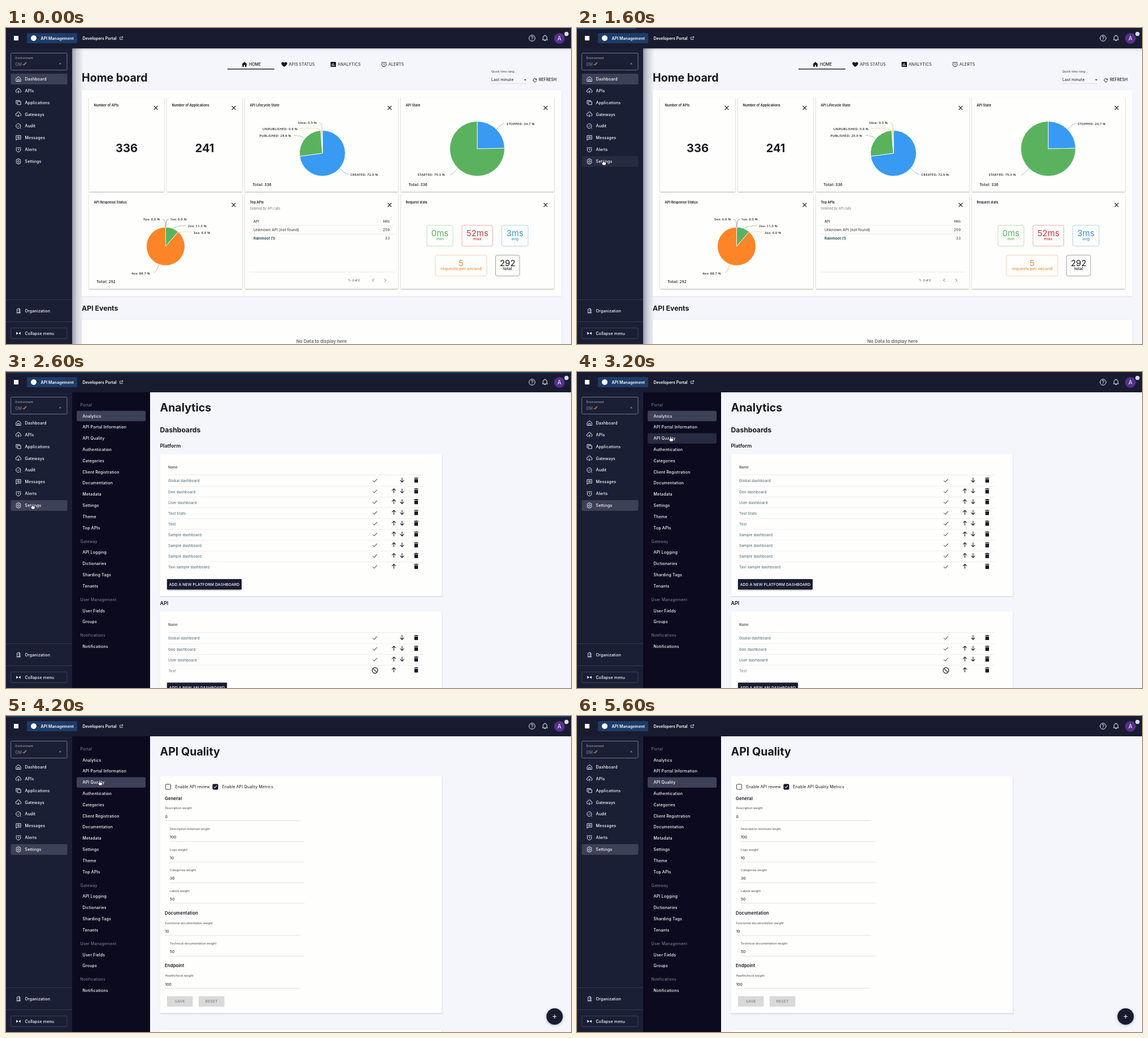
Recreate the animation shown at these times as an HTML page with a canvas. Size 1000 px wide and 560 px high, loop 6000 ms.

```html
<!DOCTYPE html>
<html lang="en">
<head>
<meta charset="utf-8">
<title>API console</title>
<style>
html, body { margin: 0; width: 100%; height: 100%; overflow: hidden; background: #f5f6fb; }
canvas { display: block; }
</style>
</head>
<body>
<canvas id="stage" width="1000" height="560"></canvas>
<script>
const c = document.getElementById('stage').getContext('2d');
const LOOP = 6000, STEP = 200;
const DARK = '#191c31', PAPER = '#fefefc', INK = '#18191f', LIT = '#3d4158', HOVER = '#272b41';
const BLUE = '#389af2', GREEN = '#5ab25f', ORANGE = '#fd8527', RED = '#cb3a3c', YELLOW = '#f3c55b';
const RULE = '#e3e4e6';

const ICON = {
  home: 'M3 10L12 3l9 7v11H3zM9 21v-8h6v8',
  upload: 'M7 18a5 5 0 0 1-1-10 6 6 0 0 1 12 1 4.5 4.5 0 0 1 0 9M12 22V12M8 16l4-4 4 4',
  squares: 'M8 8h13v12H8zM5 16H3V4h14v2',
  cloud: 'M7 18a5 5 0 0 1-1-10 6 6 0 0 1 12 1 4.5 4.5 0 0 1 0 9M12 12v9M8 17l4 4 4-4',
  audit: 'M18 18a9 9 0 1 0-3 2M17 17l5 5M8 11l3 3 5-5',
  message: 'M3 3h18v14H8l-5 4zM7 8h10M7 12h10',
  alarm: 'M12 4a8.5 8.5 0 1 0 .1 0M12 8v5l3 2M2 6l4-4M22 6l-4-4',
  gear: 'M9.5 2h5l1 3 3-1L21 8l-2 3v2l2 3-2.5 4-3-1-1 3h-5l-1-3-3 1L3 16l2-3v-2L3 8l2.5-4 3 1zM12 8.5a3.5 3.5 0 1 0 .1 0',
  door: 'M6 21V5l9-3v19zM15 5h4v16h-4M11 11v2M4 21h17',
  open: 'M10 5H4v15h15v-6M14 3h7v7M21 3l-10 10',
  help: 'M12 1.5a10.5 10.5 0 1 0 .1 0M8.5 9q0-3 3.5-3t3.5 3q0 2-2 3-1.5 1-1.5 3M12 17v1.5',
  bell: 'M3 18h18l-2-3V9q-1-6-7-6T5 9v6zM10 21h4M12 3V1',
  refresh: 'M20 8a9 9 0 1 0 1 6M21 3v6h-6',
  check: 'M3 12l6 6L21 5',
  up: 'M12 22V3M4 11l8-8 8 8',
  down: 'M12 2v19M4 13l8 8 8-8',
  block: 'M12 2a10 10 0 1 0 .1 0M5 5l14 14',
  cross: 'M4 4l16 16M20 4L4 20',
  left: 'M15 5l-7 7 7 7',
  right: 'M9 5l7 7-7 7',
  plus: 'M12 3v18M3 12h18',
  solidHome: 'M12 2L1 12h3v9h6v-7h4v7h6v-9h3z',
  heart: 'M12 22Q-2 12 1 6 6-1 12 6q6-7 11 0 3 6-11 16z',
  trash: 'M5 8h14v14H5zM4 3h5l1-1h4l1 1h5v3H4z',
  caret: 'M4 8h16l-8 9z',
  collapse: 'M2 5l9 7-9 7zM22 5l-9 7 9 7z',
  hand: 'M8 23L3 15q-2-3 0-4 2 0 4 3V3q0-2 2-2t2 2v6q10 0 10 4v5l-3 5z'
};
for (const k in ICON) ICON[k] = new Path2D(ICON[k]);

function text(s, x, y, size = 7, color = INK, weight = 500, gap = 0, align = 'left', font = 'Inter') {
  c.font = `${weight} ${size}px ${font}, sans-serif`;
  c.letterSpacing = gap + 'px';
  c.textAlign = align;
  c.fillStyle = color;
  c.fillText(s, x, y);
}
const title = (s, x, y, size = 19.6) => text(s, x, y, size, INK, 700);

function rect(x, y, w, h, color) {
  c.fillStyle = color;
  c.fillRect(x, y, w, h);
}
function box(x, y, w, h, r, fill, line) {
  c.beginPath();
  c.roundRect(x, y, w, h, r);
  if (fill) { c.fillStyle = fill; c.fill(); }
  if (line) { c.strokeStyle = line; c.lineWidth = 1; c.stroke(); }
}
function dot(x, y, r, color) {
  c.beginPath();
  c.arc(x, y, r, 0, 7);
  c.fillStyle = color;
  c.fill();
}
function card(x, y, w, h, blur = 2, alpha = .35) {
  c.save();
  c.shadowColor = `rgba(30,30,50,${alpha})`;
  c.shadowBlur = blur;
  c.shadowOffsetY = 1;
  rect(x, y, w, h, PAPER);
  c.restore();
}
// Fades from the point (x, y) over dx or dy pixels.
function shade(x, y, w, h, dx, dy, alpha) {
  const g = c.createLinearGradient(x, y, x + dx, y + dy);
  g.addColorStop(0, `rgba(25,28,55,${alpha})`);
  g.addColorStop(.4, `rgba(25,28,55,${alpha * .4})`);
  g.addColorStop(1, 'rgba(25,28,55,0)');
  rect(x, y, w, h, g);
}
// Icons are drawn on a 24-unit grid around their centre.
function icon(name, x, y, size, color, line = 2, fill) {
  c.save();
  c.translate(x - size / 2, y - size / 2);
  c.scale(size / 24, size / 24);
  if (fill) { c.fillStyle = fill; c.fill(ICON[name]); }
  if (line) { c.strokeStyle = color; c.lineWidth = line; c.stroke(ICON[name]); }
  c.restore();
}
const solid = (name, x, y, size, color) => icon(name, x, y, size, color, 0, color);

// Linear interpolation over [time, ...values] rows.
function at(keys, t) {
  const i = keys.findIndex(k => k[0] > t);
  if (i < 0) return keys[keys.length - 1].slice(1);
  if (!i) return keys[0].slice(1);
  const a = keys[i - 1], b = keys[i], p = (t - a[0]) / (b[0] - a[0]);
  return a.slice(1).map((v, j) => v + (b[j + 1] - v) * p);
}
const inside = (p, x, y, w, h) => p && p[0] > x && p[0] < x + w && p[1] > y && p[1] < y + h;

function header() {
  rect(0, 0, 1000, 36, DARK);
  rect(14, 14, 8, 8, '#fff');
  box(37, 9, 89, 18, 2, '#1d3c68');
  dot(49, 18, 5, '#fff');
  text('API Management', 61.5, 20.5, 7, '#fff', 600, .05);
  text('Developers Portal', 135.5, 20.5, 7, '#fff', 600);
  icon('open', 204, 18, 7, '#fff', 2.6);
  icon('help', 931, 18, 12, '#fff');
  icon('bell', 954, 18, 12, '#fff');
  dot(979.5, 18.5, 9.5, '#56308a');
  text('A', 979.5, 22, 10, '#fff', 400, 0, 'center');
  dot(992, 10.5, 3.7, '#dcdce8');
}

const MENU = [['Dashboard', 'home'], ['APIs', 'upload'], ['Applications', 'squares'], ['Gateways', 'cloud'],
  ['Audit', 'audit'], ['Messages', 'message'], ['Alerts', 'alarm'], ['Settings', 'gear']];

function sidebar(active, mouse) {
  rect(0, 36, 117, 524, '#1a1f36');
  box(8.5, 44.5, 99.5, 30, 2, null, '#6f7386');
  text('Environment', 16.5, 55, 5.2, '#b4b7c4', 400, .05);
  text('DM-', 16.5, 66.5, 7, '#858998', 400);
  c.lineWidth = 2;
  c.strokeStyle = '#a9713f';
  c.beginPath();
  c.moveTo(31, 66);
  c.lineTo(36, 61);
  c.stroke();
  solid('caret', 96, 63.5, 6, '#9a9dab');
  MENU.forEach(([name, ic], i) => {
    const y = 90.5 + 20.85 * i;
    if (i === active) box(8.5, y - 9.5, 100, 19, 2, LIT);
    else if (inside(mouse, 8, y - 9.5, 100, 19)) box(8.5, y - 9.5, 100, 19, 2, HOVER);
    icon(ic, 22, y, 11, '#fff', 1.9);
    text(name, 33.5, y + 2.5, 7, '#fff', 500, .2);
  });
  rect(0, 481, 117, 1, '#363a50');
  rect(0, 520, 117, 1, '#363a50');
  icon('door', 22, 501, 10, '#fff', 1.9);
  text('Organization', 33.5, 503.5, 7, '#fff', 500, .15);
  box(8.5, 531.5, 99.5, 19, 2, null, '#3d4157');
  solid('collapse', 22, 541, 9, '#fff');
  text('Collapse menu', 33.5, 543.5, 7, '#fff', 500, .15);
}

function pie(x, y, r, parts) {
  let a = -Math.PI / 2;
  for (const [share, color] of parts) {
    const b = a + share * Math.PI * 2;
    c.beginPath();
    c.moveTo(x, y);
    c.arc(x, y, r + .5, a, b);
    c.closePath();
    c.fillStyle = color;
    c.fill();
    c.strokeStyle = '#fff';
    c.lineWidth = .8;
    c.stroke();
    a = b;
  }
}
function lead(color, x1, y1, qx, qy, x2, y2) {
  c.beginPath();
  c.moveTo(x1, y1);
  c.quadraticCurveTo(qx, qy, x2, y2);
  c.strokeStyle = color;
  c.lineWidth = .6;
  c.stroke();
}
const label = (s, x, y, size = 5.8) => text(s, x, y, size, '#222', 600, .2, 'left', 'Open Sans');

function stat(x, y, w, color, value, unit) {
  c.globalAlpha = .4;
  box(x, y, w, 37, 3, null, color);
  c.globalAlpha = 1;
  text(value, x + w / 2, y + 19.7, 15, color, 400, 0, 'center');
  text(unit, x + w / 2, y + 26.5, 7.3, color, 500, .05, 'center');
}

function homePage() {
  rect(117, 36, 883, 524, '#f5f6fb');
  shade(117, 36, 20, 524, 20, 0, .42);
  shade(117, 36, 883, 4, 0, 4, .3);

  const grey = '#3d3f48';
  solid('solidHome', 422, 64.5, 11, INK);
  text('HOME', 430, 67, 7, INK, 500);
  rect(392, 72, 83, 1.4, INK);
  solid('heart', 492.5, 64.5, 11, INK);
  text('APIS STATUS', 500.5, 67, 7, grey, 500, .1);
  box(574.5, 60, 9.5, 9, 1, INK);
  [[577, 64], [579, 62], [581, 65]].forEach(([x, y]) => rect(x - .4, y, .9, 67.5 - y, '#fff'));
  text('ANALYTICS', 587, 67, 7, grey, 500, .1);
  icon('alarm', 669, 64.5, 11, INK);
  text('ALERTS', 677, 67, 7, grey, 500, .1);

  title('Home board', 134, 95);
  text('Quick time rang...', 859, 79, 5.4, '#555', 500);
  text('Last minute', 859, 94, 7, INK, 400, .1);
  rect(859, 98, 62, .7, '#d3d4d9');
  solid('caret', 919, 92, 6, '#333');
  icon('refresh', 936, 92.5, 8, INK, 2.8);
  text('REFRESH', 943, 94, 7, INK, 500);

  card(134, 110, 849, 365, 3, .08);
  const cards = [[147, 123, 133, 'Number of APIs'], [285, 123, 133, 'Number of Applications'],
    [423, 123, 271, 'API Lifecycle State'], [699, 123, 271, 'API State'],
    [147, 295, 271, 'API Response Status'], [423, 295, 271, 'Top APIs'], [699, 295, 271, 'Request stats']];
  for (const [x, y, w, name] of cards) {
    card(x, y, w, 167);
    text(name, x + 8.5, y + 16.3, 5.8, INK, 600);
    icon('cross', x + w - 15, y + 18.5, 10, INK, 2.8);
  }
  text('336', 213.5, 219.5, 20, INK, 700, 0, 'center');
  text('241', 351.5, 219.5, 20, INK, 700, 0, 'center');

  pie(560, 222, 40, [[.729, BLUE], [.259, GREEN], [.009, YELLOW], [.003, ORANGE]]);
  lead(BLUE, 590, 248, 597, 257, 606, 260);
  lead(GREEN, 510, 190.5, 521, 190, 529, 196);
  lead(YELLOW, 520, 178, 556, 176, 557.5, 182);
  lead(ORANGE, 554, 167, 560, 168, 559.5, 182);
  label('Slice: 0.3 %', 517, 169.5);
  label('UNPUBLISHED: 0.9 %', 454, 181);
  label('PUBLISHED: 25.9 %', 448.5, 192.5);
  label('CREATED: 72.9 %', 609.5, 262);
  label('Total: 336', 436.5, 279.5, 6.8);

  pie(834, 214, 48, [[.247, BLUE], [.753, GREEN]]);
  lead(BLUE, 868, 180, 875, 171, 882, 169);
  lead(GREEN, 800, 248, 793, 258, 786, 260);
  label('STOPPED: 24.7 %', 886, 171.5);
  label('STARTED: 75.3 %', 728.5, 262);
  label('Total: 336', 712.5, 279.5, 6.8);

  pie(282.5, 387, 33.5, [[.113, GREEN], [.887, ORANGE]]);
  lead('#8085e9', 277, 339, 282, 338, 282.3, 353);
  lead('#444', 288, 339, 283, 338, 282.7, 353);
  lead(GREEN, 318, 350.5, 301, 350, 294, 356);
  lead(YELLOW, 328, 362, 318, 359, 305, 363);
  lead(ORANGE, 270.5, 419, 267, 431, 262, 434);
  label('5xx: 0.0 %', 243, 341);
  label('1xx: 0.0 %', 290.5, 341);
  label('2xx: 11.3 %', 322, 353);
  label('3xx: 0.0 %', 332, 364.5);
  label('4xx: 88.7 %', 222, 436.5);
  label('Total: 292', 160.5, 451.5, 6.8);

  text('Ordered by API calls', 431.5, 322, 5.6, '#777', 400);
  text('API', 438, 345, 6, '#333', 500, .1);
  text('Hits', 679, 345, 6, '#333', 500, .1, 'right');
  text('Unknown API (not found)', 438, 360.3, 6.8, '#333', 400);
  text('259', 679, 360.3, 6.6, '#333', 400, 0, 'right');
  text('Rainmoot (1)', 438, 374.8, 6.4, '#173f49', 600);
  text('33', 679, 374.8, 6.6, '#333', 400, 0, 'right');
  [349.5, 364.5, 432].forEach(y => rect(431.5, y, 256, .7, RULE));
  text('1 - 2 of 2', 606, 448.7, 4.8, '#333', 500);
  icon('left', 650, 447, 9, '#333');
  icon('right', 671, 447, 9, '#333');

  stat(745, 349.5, 46, GREEN, '0ms', 'min');
  stat(807, 349.5, 54.5, RED, '52ms', 'max');
  stat(877.5, 349.5, 46.5, '#389ad6', '3ms', 'avg');
  stat(760, 402.5, 91, '#ec8f38', '5', 'requests per second');
  stat(866.5, 402.5, 42.5, INK, '292', 'total');

  title('API Events', 134, 501, 12.3);
  card(134, 517, 849, 60, 3, .12);
  text('No Data to display here', 558.5, 558, 8, '#666', 600, 0, 'center');
}

const SUBMENU = {
  'Portal': ['Analytics', 'API Portal Information', 'API Quality', 'Authentication', 'Categories',
    'Client Registration', 'Documentation', 'Metadata', 'Settings', 'Theme', 'Top APIs'],
  'Gateway': ['API Logging', 'Dictionaries', 'Sharding Tags', 'Tenants'],
  'User Management': ['User Fields', 'Groups'],
  'Notifications': ['Notifications']
};

function submenu(active, mouse) {
  rect(117, 36, 138, 524, '#0c0a1e');
  let y = 60.8;
  for (const group in SUBMENU) {
    text(group, 131.5, y, 7, '#85869a', 400, .2);
    for (const name of SUBMENU[group]) {
      y += 19.8;
      if (name === active) box(125, y - 11.8, 122, 18.5, 2, LIT);
      else if (inside(mouse, 125, y - 11.8, 122, 18.5)) box(125, y - 11.8, 122, 18.5, 2, HOVER);
      text(name, 135.5, y, 7, '#fff', 500, .2);
    }
    y += 24;
  }
}

function button(s, x, y, w, fill, color, shadow) {
  c.save();
  if (shadow) {
    c.shadowColor = 'rgba(0,0,0,.35)';
    c.shadowBlur = 3;
    c.shadowOffsetY = 1;
  }
  box(x, y, w, 18.5, 1, fill);
  c.restore();
  text(s, x + w / 2, y + 11.7, 6.8, color, 500, .1, 'center');
}

function table(y, h, names, add, w) {
  card(272.5, y, 499, h, 2, .18);
  text('Name', 287, y + 25, 5.8, '#555', 600, .1);
  rect(287, y + 36.5, 452, .7, RULE);
  names.forEach((name, i) => {
    const row = y + 47.5 + 19.1 * i, last = i === names.length - 1, off = last && name === 'Test';
    text(name, 287, row + 2.4, 6.5, off ? '#777' : '#3d6270', off ? 'italic 400' : 400, .1);
    icon(off ? 'block' : 'check', 653, row - .5, off ? 12 : 10, INK, 2.4);
    if (i) icon('up', 686.5, row - 1.5, 10, INK, 2.6);
    if (!last) icon('down', 701, row - 1.5, 10, INK, 2.6);
    solid('trash', 726, row - 1.5, 11, INK);
    if (!last) rect(287, row + 9.2, 452, .6, RULE);
  });
  button(add, 285, y + 49.5 + 19.1 * names.length, w, DARK, '#fff', true);
}

function analyticsPage() {
  title('Analytics', 272.5, 70);
  title('Dashboards', 272.5, 106.5, 12.2);
  text('Platform', 272.5, 134, 9, INK, 600);
  table(145.5, 251.5, ['Global dashboard', 'Geo dashboard', 'User dashboard', 'Test Stats', 'Test',
    'Sample dashboard', 'Sample dashboard', 'Sample dashboard', 'Tavi sample dashboard'],
    'ADD A NEW PLATFORM DASHBOARD', 132);
  text('API', 272.5, 413, 9, INK, 600);
  table(424.5, 160, ['Global dashboard', 'Geo dashboard', 'User dashboard', 'Test'],
    'ADD A NEW API DASHBOARD', 106);
}

const FIELDS = [['Description weight', 0, 0, 178], ['Description minimum length', 100, 1, 214.6],
  ['Logo weight', 10, 1, 251.2], ['Categories weight', 30, 1, 287.7], ['Labels weight', 50, 1, 324.2],
  ['Functional documentation weight', 10, 0, 381.3], ['Technical documentation weight', 50, 1, 417.9],
  ['Healthcheck weight', 100, 0, 475]];

// p runs from 0 (just opened) to 1 (form settled).
function qualityPage(p) {
  title('API Quality', 272.5, 70);
  card(272.5, 106.5, 499, 420, 2, .18);
  box(282.5, 121, 9, 9, 1, null, '#444');
  text('Enable API review', 299.5, 127.5, 7, INK, 400, .12);
  const ready = p > .5;
  box(366, 121, 9, 9, 1, ready ? '#15162b' : '#c9c9c9', ready ? '#15162b' : '#777');
  icon('check', 370.5, 125.5, 7, ready ? '#fff' : '#888', 3.5);
  text('Enable API Quality Metrics', 382.5, 127.5, 7, INK, 400, .12);
  text('General', 281, 148.5, 7.8, INK, 600, .1);
  text('Documentation', 281, 351.5, 7.8, INK, 600, .1);
  text('Endpoint', 281, 445, 7.8, INK, 600, .1);
  for (const [name, value, indent, y] of FIELDS) {
    const x = 281.5 + indent * 8.5;
    text(name, x, y - 4.6 - 8 * p, 6.4 - 1.1 * p, '#5f6068', 500);
    text(value, x, y + 2.5, 6.8, INK, 400);
    rect(x - .5, y + 7.3, 239, .7, '#d6d7da');
  }
  button('SAVE', 285, 496.5, 45.5, ready ? '#d9d9d9' : '#4c4b62', ready ? '#858585' : '#2b2b3c', !ready);
  button('RESET', 341, 496.5, 45.5, ready ? '#d9d9d9' : '#ececec', '#858585', !ready);
  card(272.5, 556, 499, 30, 2, .18);
  c.save();
  c.shadowColor = 'rgba(0,0,0,.3)';
  c.shadowBlur = 4;
  c.shadowOffsetY = 1;
  dot(971, 532.5, 14.5, DARK);
  c.restore();
  icon('plus', 971, 532.5, 9, '#fff', 3);
}

const MOUSE = [[200, 130, 330], [800, 45, 234], [2600, 45, 234], [3200, 164, 114], [5000, 164, 114], [5600, 230, 220]];
// time, width and opacity of the loading bar
const BAR = [[1400, 0, 0], [1600, 105, .45], [1800, 428, 1], [2200, 760, 1], [2400, 760, 1], [2600, 1000, .4],
  [2800, 1000, 0], [3400, 0, 0], [3600, 145, .45], [3800, 480, 1], [4000, 860, 1], [4200, 1000, .4], [4400, 1000, 0]];

function draw(t) {
  const mouse = t >= 200 && t < 5600 ? at(MOUSE, t) : null;
  const home = t < 1800, quality = t >= 3600;
  if (home) homePage();
  else {
    rect(255, 36, 745, 524, '#f5f6fb');
    if (quality) qualityPage(at([[3600, 0], [3800, .85], [4000, 1]], t)[0]);
    else analyticsPage();
    submenu(quality ? 'API Quality' : 'Analytics', mouse);
  }
  sidebar(home ? 0 : 7, mouse);
  header();
  const [w, alpha] = at(BAR, t);
  c.globalAlpha = alpha;
  rect(0, 0, w, 1.6, '#2383cf');
  c.globalAlpha = 1;
  if (t >= 1800 && t < 2600) {
    box(-1, 548, 334, 13, [0, 3, 0, 0], '#dbdce0', '#b9bac0');
    text('Waiting for apim-master-api.team-apim.gravitee.dev...', 3, 557, 6.5, '#3b3c42', 400, .05);
  }
  if (mouse) icon('hand', mouse[0] + 2.5, mouse[1] + 4.5, 10.5, '#111', 2, '#fff');
}

function tick() {
  const t = performance.now() % LOOP;
  draw(Math.floor(t / STEP) * STEP);
  requestAnimationFrame(tick);
}
tick();
</script>
</body>
</html>
```
